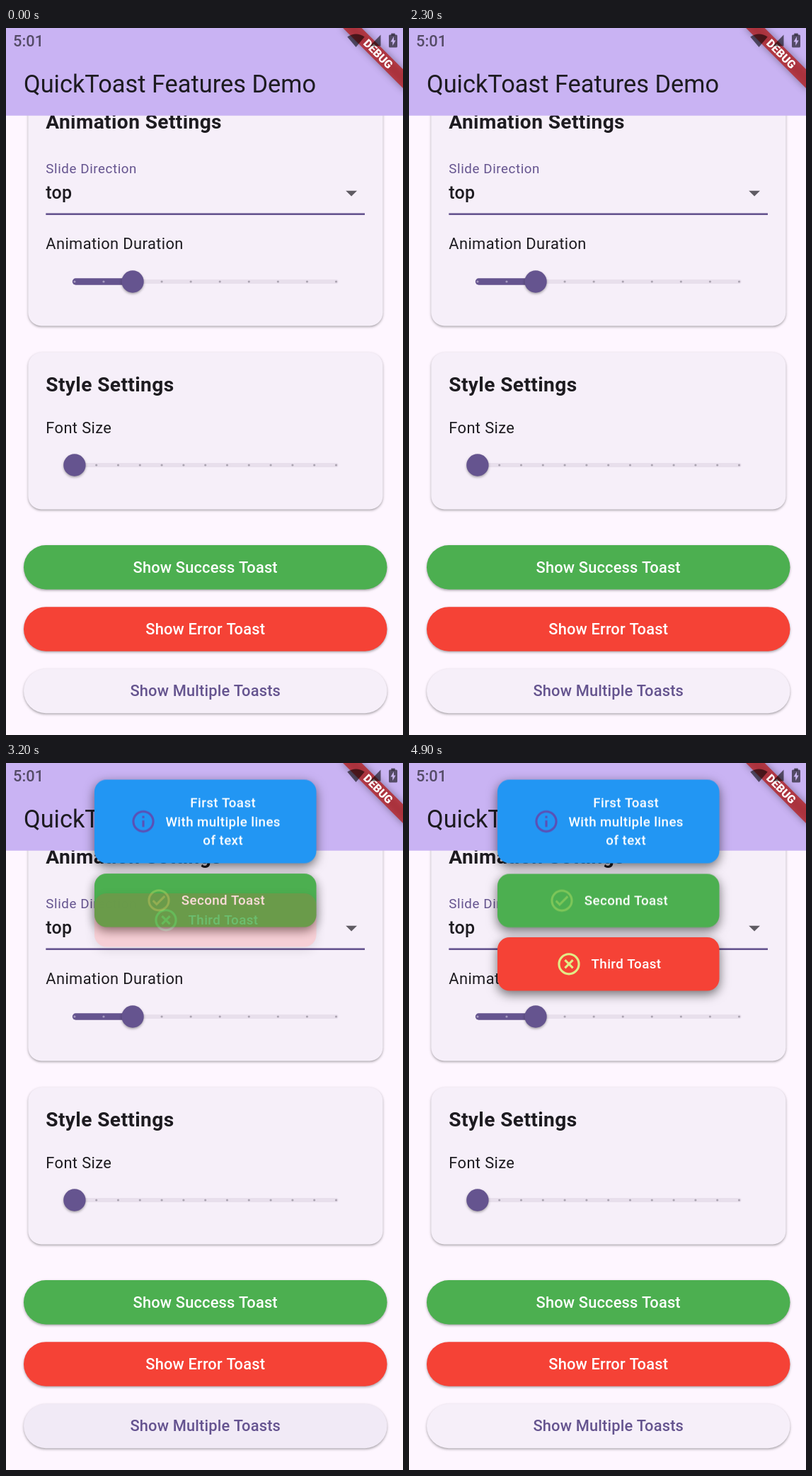
Animation of 561x998 px, one loop 5000 ms. Source, as an HTML page with a canvas:

```html
<!DOCTYPE html>
<html lang="en">
<head>
<meta charset="utf-8">
<title>Toast demo</title>
<style>
  html, body { margin: 0; width: 100%; height: 100%; overflow: hidden; background: #fef6ff; }
  canvas { display: block; width: 561px; height: 998px; }
</style>
</head>
<body>
<canvas id="stage" width="561" height="998"></canvas>
<script>
const W = 561, H = 998, DP = 1.5625, LOOP = 5000, STEP = 100;
const INK = '#1d1b20', PRIMARY = '#65548f', CARD = '#f6eff9', STATUS = 'rgba(0,0,0,.58)';
const ctx = document.getElementById('stage').getContext('2d');

const clamp = v => Math.min(1, Math.max(0, v));
const easeOut = v => 1 - (1 - clamp(v)) ** 3;

// Sizes and letter spacing are in dp, positions in pixels.
function text(c, str, x, y, { size = 14, weight = 400, color = INK, gap = 0, align = 'left' } = {}) {
  c.font = `${weight} ${size * DP}px Roboto, sans-serif`;
  c.letterSpacing = gap * DP + 'px';
  c.textAlign = align;
  c.fillStyle = color;
  c.fillText(str, x, y);
}

function box(c, x, y, w, h, r, color) {
  c.fillStyle = color;
  c.beginPath();
  c.roundRect(x, y, w, h, r);
  c.fill();
}

function dot(c, x, y, r, color) {
  c.fillStyle = color;
  c.beginPath();
  c.arc(x, y, r, 0, Math.PI * 2);
  c.fill();
}

function poly(c, points, color) {
  c.fillStyle = color;
  c.beginPath();
  points.forEach(([x, y]) => c.lineTo(x, y));
  c.fill();
}

function withShadow(c, color, blur, dy, draw) {
  c.save();
  c.shadowColor = color;
  c.shadowBlur = blur;
  c.shadowOffsetY = dy;
  draw();
  c.restore();
}

function raised(c, draw) {
  withShadow(c, 'rgba(0,0,0,.34)', 3.5, 1.6, draw);
}

function slider(y, divisions, value) {
  const x0 = 96.9, step = 369.6 / divisions, thumb = x0 + value * step;
  box(ctx, 93.8, y - 3, 375.8, 6, 3, '#e8dfec');
  if (value) box(ctx, 93.8, y - 4.7, thumb - 93.8, 9.4, 4.7, PRIMARY);
  for (let i = 0; i <= divisions; i++) {
    dot(ctx, x0 + i * step, y, 1.6, i < value ? '#a79bc0' : '#aaa3b0');
  }
  raised(ctx, () => dot(ctx, thumb, y, 15.7, PRIMARY));
}

function card(y, h) {
  raised(ctx, () => box(ctx, 31.3, y, 501.2, h, 18.75, CARD));
}

function button(label, y, fill, color) {
  raised(ctx, () => box(ctx, 25, y, 513.5, 62.5, 31.25, fill));
  text(ctx, label, 281.7, y + 38.7, { weight: 500, gap: .1, color, align: 'center' });
}

function page(press) {
  const heading = { size: 18, weight: 700, gap: .25 }, body = { gap: .25 };
  ctx.fillStyle = '#fef6ff';
  ctx.fillRect(0, 0, W, H);

  card(80, 340.5);
  text(ctx, 'Animation Settings', 56.3, 141.5, heading);
  text(ctx, 'Slide Direction', 56.3, 204.5, { size: 12, gap: .375, color: PRIMARY });
  text(ctx, 'top', 56.3, 240.7, { size: 16, weight: 500, gap: .15 });
  poly(ctx, [[480.2, 229.7], [496, 229.7], [488.1, 237.6]], '#5f5b63');
  ctx.fillStyle = PRIMARY;
  ctx.fillRect(56.3, 261.4, 450.7, 2.6);
  text(ctx, 'Animation Duration', 56.3, 312.3, body);
  slider(358, 9, 2);

  card(458, 221.5);
  text(ctx, 'Style Settings', 56.3, 512.6, heading);
  text(ctx, 'Font Size', 56.3, 571.5, body);
  slider(617, 12, 0);

  button('Show Success Toast', 730, '#4caf50', '#fff');
  button('Show Error Toast', 817.2, '#f54236', '#fff');
  button('Show Multiple Toasts', 904.7, CARD, PRIMARY);
  if (press) {
    box(ctx, 25, 904.7, 513.5, 62.5, 31.25, `rgba(101,84,143,${.1 * press})`);
  }
}

function debugBanner() {
  ctx.save();
  ctx.translate(563.5, -1);
  ctx.rotate(Math.PI / 4);
  withShadow(ctx, 'rgba(0,0,0,.5)', 11, 0, () =>
    box(ctx, -40 * DP, 28 * DP, 80 * DP, 12 * DP, 0, 'rgba(183,28,28,.75)'));
  text(ctx, 'DEBUG', 0, 37.6 * DP, { size: 10.2, weight: 900, color: '#fff', align: 'center' });
  ctx.restore();
}

function statusBar() {
  text(ctx, '5:01', 10, 25.7, { weight: 500, color: STATUS });
  ctx.fillStyle = STATUS;
  ctx.beginPath();
  ctx.moveTo(494.5, 27);
  ctx.lineTo(482.3, 12.4);
  ctx.quadraticCurveTo(494.5, 4.5, 506.7, 12.4);
  ctx.fill();
  poly(ctx, [[514, 25.5], [529.5, 25.5], [529.5, 9.5]], STATUS);
  ctx.fillStyle = STATUS;
  ctx.fillRect(544.3, 7.5, 5.4, 3);
  box(ctx, 541, 9.5, 12, 18, 1.5, STATUS);
  poly(ctx, [[548, 12], [543.6, 19.6], [546.3, 19.6], [546.3, 25], [550.6, 17.4], [548, 17.4]], '#c9b5f0');
}

function appBar() {
  ctx.fillStyle = '#c9b3f3';
  ctx.fillRect(0, 0, W, 123.7);
  text(ctx, 'QuickToast Features Demo', 25, 91, { size: 22 });
}

// Icon strokes on a 24 dp grid centred on 0,0.
const icons = {
  info(c) { c.moveTo(0, -1); c.lineTo(0, 5); c.moveTo(0, -5); c.lineTo(0, -3); },
  check(c) { c.moveTo(-5.3, .3); c.lineTo(-2, 3.6); c.lineTo(5.3, -3.7); },
  cross(c) { c.moveTo(-3.6, -3.6); c.lineTo(3.6, 3.6); c.moveTo(3.6, -3.6); c.lineTo(-3.6, 3.6); }
};

const PAD = 30, LINE = 26.8, TOAST_W = 313.5;

// Each toast is drawn once on its own layer so that it fades as a whole.
function makeToast({ y, h, fill, icon, iconX, tint, textX, lines, start }) {
  const layer = document.createElement('canvas');
  layer.width = TOAST_W + PAD * 2 + 1;
  layer.height = h + PAD * 2 + 1;
  const c = layer.getContext('2d');
  c.translate(PAD, PAD);
  withShadow(c, 'rgba(0,0,0,.55)', 15, 5, () => box(c, 0, 0, TOAST_W, h, 17, fill));

  c.save();
  c.translate(iconX, h / 2);
  c.scale(DP, DP);
  c.strokeStyle = tint;
  c.lineWidth = 2;
  c.beginPath();
  c.arc(0, 0, 9, 0, Math.PI * 2);
  c.stroke();
  c.beginPath();
  icons[icon](c);
  c.stroke();
  c.restore();

  const top = h / 2 - (lines.length - 1) * LINE / 2 + 6.6;
  lines.forEach((line, i) => text(c, line, textX, top + i * LINE,
    { size: 12, weight: 500, gap: .25, color: '#fff', align: 'center' }));
  return { layer, y, h, start };
}

const toasts = [
  { y: 23.5, h: 118, fill: '#2296f3', icon: 'info', iconX: 69, tint: '#5b50b5', textX: 181.7,
    lines: ['First Toast', 'With multiple lines', 'of text'], start: 2725 },
  { y: 156.5, h: 75.5, fill: '#4caf50', icon: 'check', iconX: 91, tint: '#7dc659', textX: 182,
    lines: ['Second Toast'], start: 2953 },
  { y: 246, h: 75.5, fill: '#f54236', icon: 'cross', iconX: 101, tint: '#e2eb86', textX: 182,
    lines: ['Third Toast'], start: 3181 }
].map(makeToast);

function drawToast({ layer, y, h, start }, t) {
  const p = easeOut((t - start) / 300);
  if (!p) return;
  ctx.globalAlpha = p;
  ctx.drawImage(layer, 125 - PAD, y - (1 - p) * h - PAD);
  ctx.globalAlpha = 1;
}

function render(t) {
  const press = clamp((t - 2560) / 140) * (1 - clamp((t - 3000) / 300));
  page(press);
  appBar();
  toasts.forEach(toast => drawToast(toast, t));
  debugBanner();
  statusBar();
}

function tick() {
  const t = (performance.now() + 1) % LOOP;
  render(Math.floor(t / STEP) * STEP);
  requestAnimationFrame(tick);
}
tick();
</script>
</body>
</html>
```
